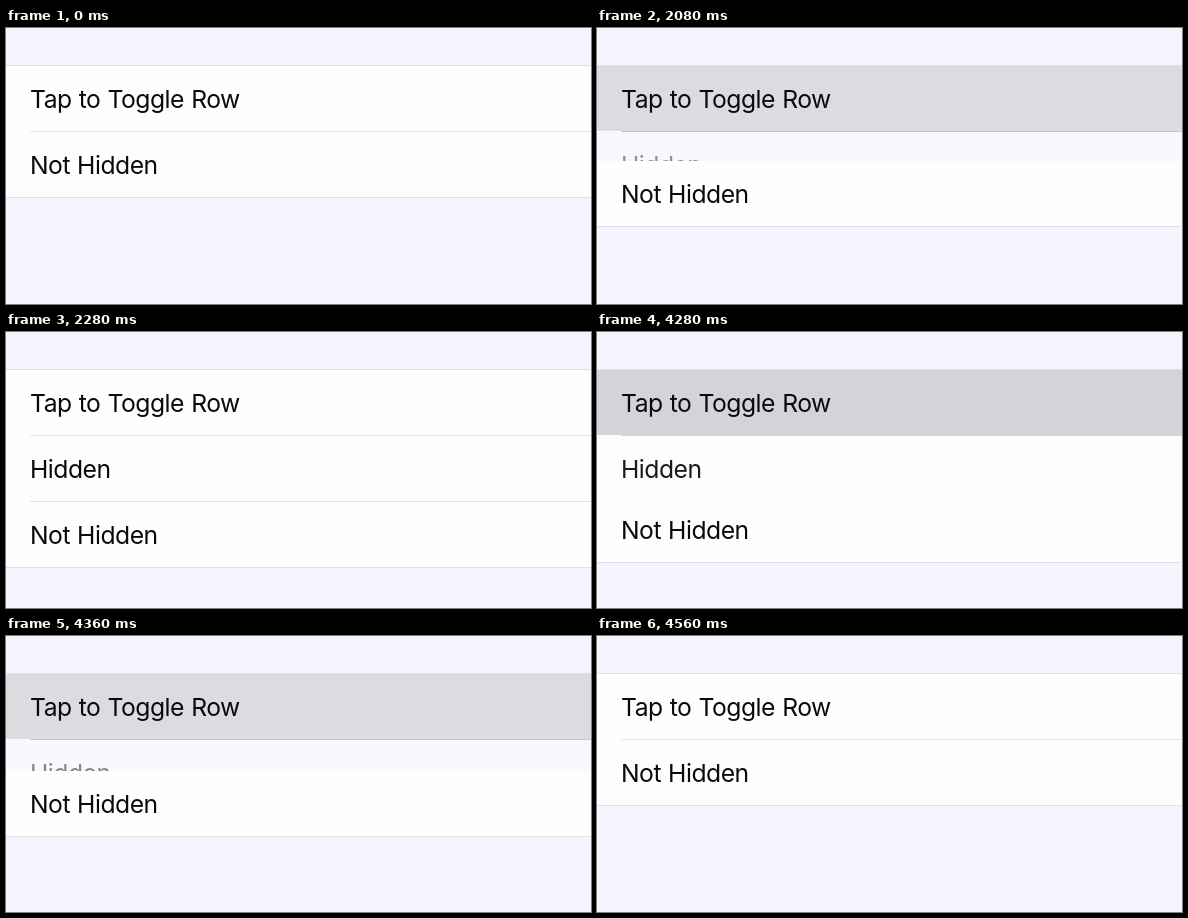
An HTML page that plays this animation: 585 px wide and 276 px high, repeating every 4600 ms.

```html
<!DOCTYPE html>
<html lang="en">
<head>
<meta charset="utf-8">
<title>Toggle row</title>
<style>
  html, body { margin: 0; width: 100%; height: 100%; overflow: hidden; background: #f4f3fe; }
  svg { display: block; }
  text {
    font: 24.7px Inter, "Liberation Sans", sans-serif;
    font-optical-sizing: none;
    letter-spacing: -.5px;
    word-spacing: .7px;
    fill: #0a0a0c;
  }
  .row { fill: #fefefe; }
  .line { fill: #e1e0e7; }
  .highlight { fill: #d4d3d9; }
</style>
</head>
<body>
<svg width="585" height="276" viewBox="0 0 585 276">
  <rect class="line" y="37" width="585" height="1"/>
  <rect class="row" y="38" width="585" height="66"/>
  <g id="highlight" class="highlight">
    <rect y="38" width="585" height="65"/>
    <rect x="24" y="103" width="561" height="1"/>
  </g>
  <rect id="separator" x="24" y="103" width="561" height="1" fill="#3c3c43" fill-opacity=".13"/>
  <text x="24" y="80">Tap to Toggle Row</text>
  <g id="hidden">
    <rect class="row" y="104" width="585" height="66"/>
    <rect class="line" x="24" y="169" width="561" height="1"/>
    <text x="24" y="146">Hidden</text>
  </g>
  <g id="last">
    <rect class="row" y="104" width="585" height="66"/>
    <rect id="footer" class="line" y="169" width="585" height="1"/>
    <text x="24" y="146">Not Hidden</text>
  </g>
</svg>
<script>
const LOOP = 4600, STEP = 40, ROW = 66;
const OPEN_AT = 2000, CLOSE_AT = 4280;
const SLIDE = 225, FADE = 280, LINE_FADE = 80;

const part = id => document.getElementById(id);
const [highlight, separator, hidden, last, footer] =
  ["highlight", "separator", "hidden", "last", "footer"].map(part);

const clamp = x => Math.min(1, Math.max(0, x));
const ease = x => { const s = clamp(x); return s * s * (3 - 2 * s); };

function draw(time) {
  const t = Math.floor((time % LOOP) / STEP) * STEP;
  const closing = t >= CLOSE_AT;
  const tapped = t >= OPEN_AT;
  const since = t - (closing ? CLOSE_AT : OPEN_AT);

  // The slide is already slightly under way on the first tapped step.
  const slide = ease((since + (closing ? 37 : 23)) / SLIDE);
  const open = !tapped ? 0 : closing ? 1 - slide : slide;
  const lineOpacity = tapped ? clamp(since / LINE_FADE) : 1;

  highlight.setAttribute("opacity", tapped ? 1 - ease(since / FADE) : 0);
  separator.setAttribute("opacity", lineOpacity);
  footer.setAttribute("opacity", closing ? 1 : lineOpacity);
  hidden.setAttribute("opacity", open);
  last.setAttribute("transform", `translate(0 ${Math.round(open * ROW)})`);
}

const start = performance.now();
function tick() {
  draw(performance.now() - start);
  requestAnimationFrame(tick);
}
tick();
</script>
</body>
</html>
```
